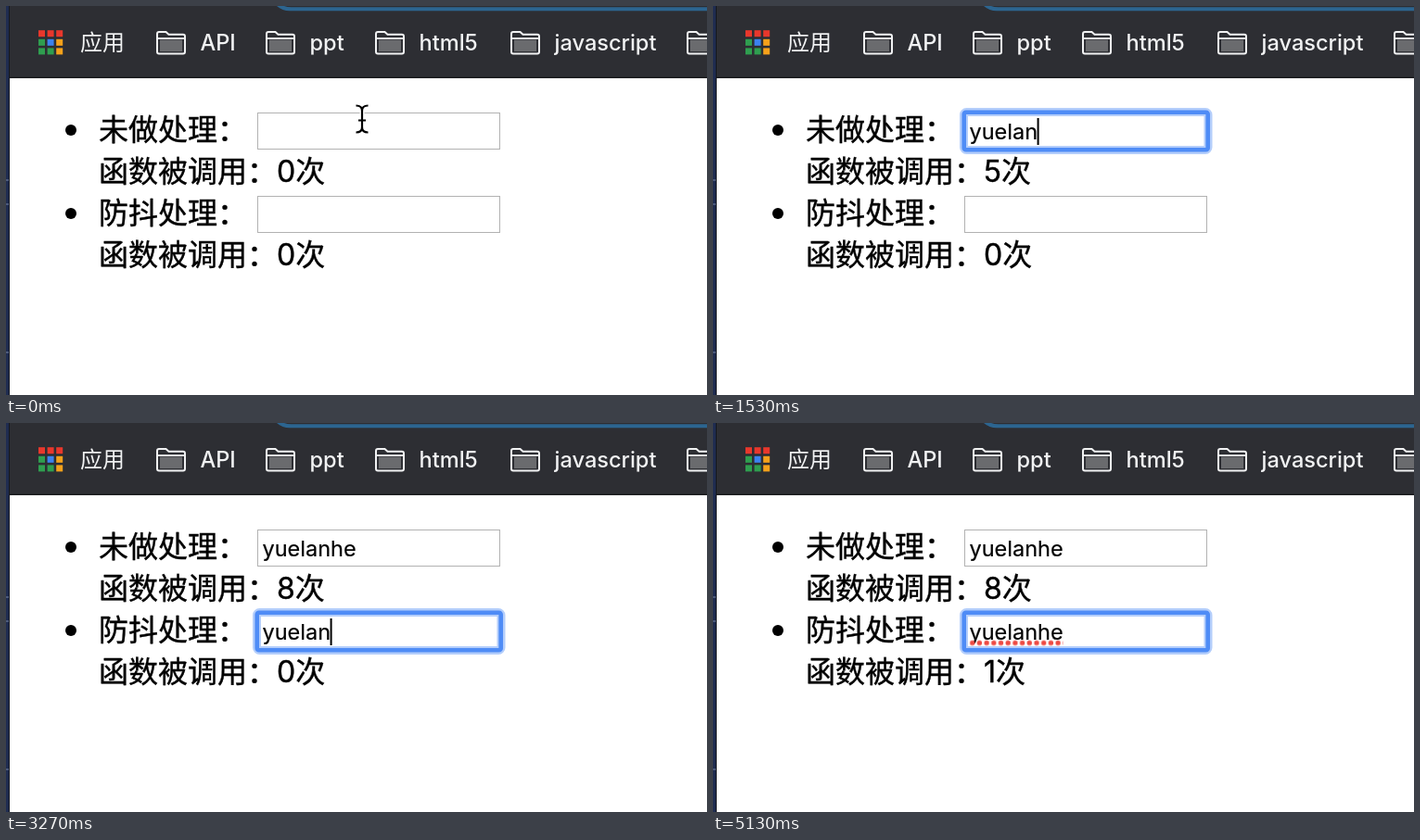
An HTML page that plays this animation: 756 by 420 pixels, repeating every 5.54 s.

```html
<!DOCTYPE html>
<html lang="zh-CN">
<head>
<meta charset="utf-8">
<title>防抖</title>
<style>
  html, body { margin: 0; width: 100%; height: 100%; overflow: hidden; background: #fff; }
  svg { display: block; width: 756px; height: 420px; }
  text { font-family: Inter, "Noto Sans CJK SC", "Noto Sans CJK", sans-serif; white-space: pre; }
  .bar text { font-size: 23.6px; font-weight: 500; fill: #f1f2f3; }
  .bar .apps { font-size: 24px; }
  .page text { font-size: 32px; fill: #000; stroke: #000; stroke-width: .4; }
  .page .value { font-size: 23.5px; stroke-width: .2; }
  .box { fill: #fff; stroke: #b2b2b2; }
  .ring rect { fill: none; }
</style>
</head>
<body>
<svg viewBox="0 0 756 420">
  <defs>
    <g id="folder">
      <path d="M1 22.500V3Q1 1 3 1H10.500L13.500 3.800H29Q31 3.800 31 6V22.500Q31 24.500 29 24.500H3Q1 24.500 1 22.500Z" fill="#2d2e33" stroke="#f1f2f3" stroke-width="2"/>
      <path d="M4 9.500H28V22H4Z" fill="#6a6b6e"/>
      <path d="M1 8H31" stroke="#f1f2f3" stroke-width="1.800"/>
    </g>
    <g id="focus" class="ring">
      <rect x="270.500" y="114.500" width="263.500" height="41" rx="3" stroke="#b4cefb" stroke-width="9"/>
      <rect x="270.700" y="114.700" width="263" height="40.600" rx="2" stroke="#4f8cf6" stroke-width="4.600"/>
    </g>
    <path id="beam" d="M377.500 107.500Q384 107.500 384 113V131Q384 136.500 377.500 136.500M390.500 107.500Q384 107.500 384 113M384 131Q384 136.500 390.500 136.500M380 123.500H388" fill="none"/>
    <pattern id="dots" x="276.500" y="234.500" width="7.700" height="6" patternUnits="userSpaceOnUse">
      <circle cx="3.200" cy="2.900" r="2.700" fill="#ee4a43"/>
    </pattern>
  </defs>

  <rect width="756" height="420" fill="#fff"/>
  <g class="bar">
    <rect x="4" width="752" height="78" fill="#2d2e33"/>
    <rect x="4" y="76.500" width="752" height="1.500" fill="#1b1c1f"/>
    <path d="M292 0Q298 5.300 306 5.300H756V1.300H308Q303 1.300 300 0Z" fill="#2c6590"/>
    <g id="grid"></g>
    <text class="apps" x="80" y="48">应用</text>
    <g id="links"></g>
  </g>
  <rect width="4" height="420" fill="#1f2c50"/>
  <rect x="3" width="1" height="420" fill="#15181f"/>
  <path d="M0 188h3M0 214h3M0 374h3" stroke="#4b597c" stroke-width="2"/>

  <g class="page">
    <circle cx="70" cy="134" r="6"/>
    <circle cx="70" cy="224" r="6"/>
    <text x="100" y="144.500">未做处理：</text>
    <text x="100" y="190.200">函数被调用：</text>
    <text x="100" y="234.500">防抖处理：</text>
    <text x="100" y="280.200">函数被调用：</text>
    <text id="count0" x="292" y="190.200"></text>
    <text id="count1" x="292" y="280.200"></text>
    <rect class="box" x="271.500" y="115.500" width="261" height="39"/>
    <rect class="box" x="271.500" y="205.500" width="261" height="39"/>
    <use id="ring" href="#focus"/>
    <text id="value0" class="value" x="276.500" y="144"></text>
    <text id="value1" class="value" x="276.500" y="234"></text>
    <rect id="misspelt" x="276.500" y="234.500" width="101" height="6" fill="url(#dots)"/>
    <rect id="caret" width="2" height="29"/>
    <g id="pointer">
      <use href="#beam" stroke="#fff" stroke-width="5"/>
      <use href="#beam" stroke="#000" stroke-width="2.200"/>
    </g>
  </g>
</svg>
<script>
  const $ = id => document.getElementById(id);
  const LOOP = 5540;
  const WORD = 'yuelanhe';
  const HOLD = 140; // key press to key release

  const typed = [
    [730, 870, 1000, 1130, 1330, 1530, 1730, 1930],
    [2670, 2730, 2870, 3000, 3130, 3270, 3400, 3530]
  ];
  const calls = [typed[0].map(t => t + HOLD), [4070]];
  const FOCUS = [70, 2200];
  const caretOff = [[600, 730], [4000, 4530], [5000, LOOP]];

  const passed = (times, t) => times.filter(at => t >= at).length;
  const show = (id, on) => $(id).setAttribute('visibility', on ? 'visible' : 'hidden');
  const setText = (id, s) => { if ($(id).textContent !== s) $(id).textContent = s; };

  const [R, G, B, Y] = ['#e8372c', '#2f9e4f', '#3b82f0', '#f5a11b'];
  $('grid').innerHTML = [R, R, R, G, B, Y, G, G, Y].map((c, i) =>
    `<rect x="${35 + i % 3 * 9.6}" y="${26.2 + Math.floor(i / 3) * 9.6}" width="7" height="7" fill="${c}"/>`).join('');
  $('links').innerHTML = [[162, 'API'], [280, 'ppt'], [398, 'html5'], [544, 'javascript'], [734, '']].map(([x, s]) =>
    `<use href="#folder" x="${x}" y="27"/><text x="${x + 47.5}" y="48">${s}</text>`).join('');

  function draw(t) {
    for (const i of [0, 1]) {
      setText('value' + i, WORD.slice(0, passed(typed[i], t)));
      setText('count' + i, passed(calls[i], t) + '次');
    }
    const active = passed(FOCUS, t) - 1;
    const focused = active >= 0;
    show('ring', focused);
    show('caret', focused && !caretOff.some(([a, b]) => t >= a && t < b));
    show('pointer', t < typed[0][0]);
    show('misspelt', t >= 4470);
    if (focused) {
      $('ring').setAttribute('y', active * 90);
      $('caret').setAttribute('x', 276 + $('value' + active).getComputedTextLength());
      $('caret').setAttribute('y', 121 + active * 90);
    }
  }

  const start = performance.now();
  function tick() {
    draw((performance.now() - start) % LOOP);
    requestAnimationFrame(tick);
  }
  tick();
</script>
</body>
</html>
```
